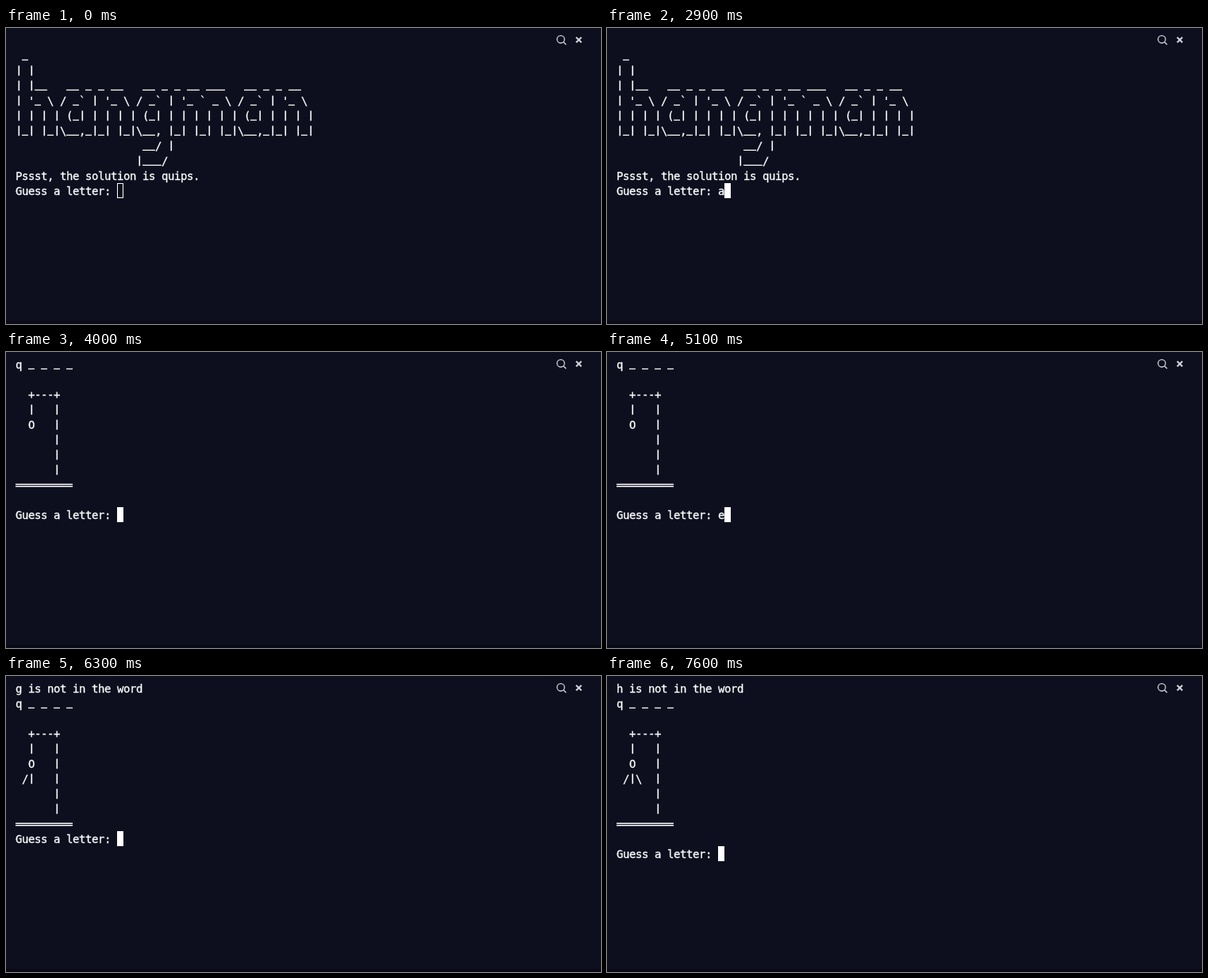
Animation of 750 by 374 pixels, one loop 8000 ms. Source, as an HTML page:

```html
<!DOCTYPE html>
<html lang="en">
<head>
<meta charset="utf-8">
<title>Hangman</title>
<style>
  html, body { margin: 0; width: 100%; height: 100%; overflow: hidden; background: #0d0f1e; }
  svg { display: block; width: 100%; height: 100%; }
  text {
    font: 14px "DejaVu Sans Mono", "Noto Sans Mono", monospace;
    font-variant-ligatures: none;
    white-space: pre;
    fill: #fff; stroke: #fff; stroke-width: .3;
  }
</style>
</head>
<body>
<svg viewBox="0 0 750 374">
  <rect width="750" height="374" fill="#0d0f1e"/>
  <rect y="370" width="750" height="4" fill="#0a0b17"/>
  <g fill="none" stroke="#d3d4da">
    <circle cx="699.3" cy="14.3" r="4.7" stroke-width="1.3"/>
    <path d="M702.7 17.7l3.3 3.3" stroke-width="1.4"/>
    <path d="M718.7 11.7l6.6 6.6m0-6.6l-6.6 6.6" stroke-width="2"/>
  </g>
  <g id="lines"><text></text></g>
  <path id="art" fill="#fff"/>
  <rect id="cursor" stroke="#fff" width="7" height="18"/>
</svg>
<script>
const LOOP = 8000, LEFT = 12, TOP = 6, COL = 8, ROW = 19;
const $ = id => document.getElementById(id);
const PROMPT = 'Guess a letter: ';

const intro = [
  '',
  ' _',
  '| |',
  '| |__   __ _ _ __   __ _ _ __ ___   __ _ _ __',
  "| '_ \\ / _` | '_ \\ / _` | '_ ` _ \\ / _` | '_ \\",
  '| | | | (_| | | | | (_| | | | | | | (_| | | | |',
  '|_| |_|\\__,_|_| |_|\\__, |_| |_| |_|\\__,_|_| |_|',
  '                    __/ |',
  '                   |___/',
  'Pssst, the solution is quips.'
];

const gallows = arms => [
  '',
  '  +---+',
  '  |   |',
  '  O   |',
  ` ${arms.padEnd(5)}|`,
  '      |',
  '      |',
  '========='
];
const miss = letter => `${letter} is not in the word`;
const found = 'q _ _ _ _';

const screens = {
  intro,
  a: [miss('a'), '_ _ _ _ _', ...gallows(''), ''],
  q: [found, ...gallows(''), ''],
  e: [miss('e'), found, ...gallows(' |'), ''],
  g: [miss('g'), found, ...gallows('/|')],
  h: [miss('h'), found, ...gallows('/|\\'), '']
};

// Start time, screen above the prompt, typed letter, hollow cursor
const steps = [
  [0, 'intro', '', true],
  [100, 'intro', ''],
  [200, 'intro', '', true],
  [1000, 'intro', ''],
  [1800, 'intro', 'a'],
  [3000, 'a', ''],
  [3500, 'a', 'q'],
  [4000, 'q', ''],
  [4600, 'q', 'e'],
  [5200, 'e', ''],
  [5600, 'e', 'g'],
  [6300, 'g', ''],
  [6700, 'g', 'h'],
  [7600, 'h', '']
];

// Letter spacing that keeps any monospace font on the terminal grid
const pen = document.createElement('canvas').getContext('2d');
const style = getComputedStyle(document.querySelector('text'));
pen.font = `${style.fontSize} ${style.fontFamily}`;
const spacing = COL - pen.measureText('M').width;

const box = (x, y, w, h) => `M${x} ${y}h${w}v${h}h${-w}z`;
const strokes = {
  '|': (x, y) => box(x + 3.5, y + 3.6, 1.6, 12.6),
  '_': (x, y) => box(x, y + 14.7, COL, 1.4),
  '=': (x, y) => box(x, y + 8.5, COL, 1.6) + box(x, y + 10.9, COL, 1.6)
};

function textLine(content, y) {
  const line = document.createElementNS('http://www.w3.org/2000/svg', 'text');
  line.setAttribute('x', LEFT);
  line.setAttribute('y', y);
  line.setAttribute('letter-spacing', spacing);
  line.textContent = content;
  return line;
}

function show([, name, typed, hollow]) {
  const rows = [...screens[name], PROMPT + typed];
  let d = '';
  $('lines').replaceChildren(...rows.map((row, r) => {
    const y = TOP + r * ROW;
    const letters = row.replace(/[|_=]/g, (c, i) => {
      d += strokes[c](LEFT + i * COL, y);
      return ' ';
    });
    return textLine(letters, y + 15);
  }));
  $('art').setAttribute('d', d);

  const cursor = $('cursor');
  cursor.setAttribute('x', LEFT + (PROMPT + typed).length * COL + .5);
  cursor.setAttribute('y', TOP + (rows.length - 1) * ROW + .5);
  cursor.setAttribute('fill', hollow ? 'none' : '#fff');
}

let current;
function render(now) {
  const t = now % LOOP;
  const step = steps.findLast(s => s[0] <= t);
  if (step !== current) show(current = step);
}

const start = performance.now();
function tick() {
  render(performance.now() - start);
  requestAnimationFrame(tick);
}
tick();
</script>
</body>
</html>
```
